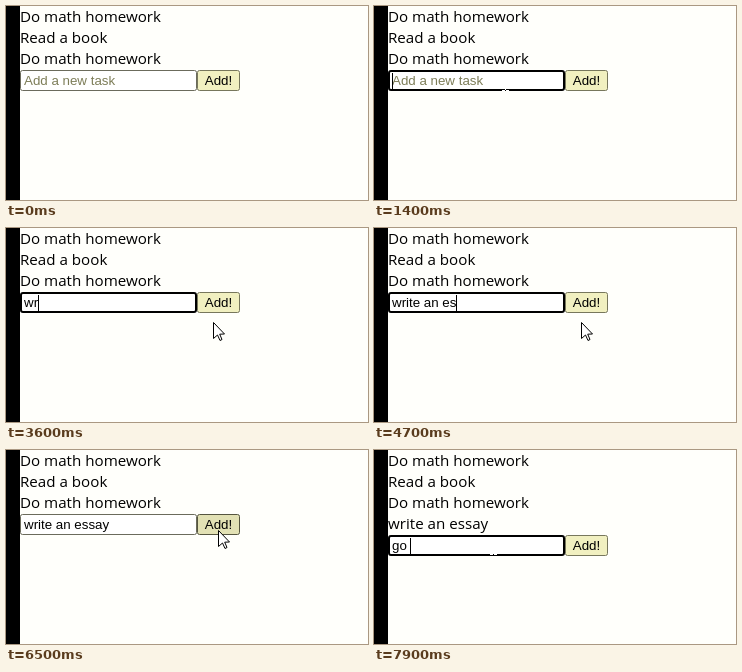
Write an HTML page with a canvas that moves like this. It is 362 px wide and 194 px high and loops after 8000 ms.

```html
<!DOCTYPE html>
<html lang="en">
<head>
<meta charset="utf-8">
<title>Task list</title>
<style>
html, body { margin: 0; width: 100%; height: 100%; overflow: hidden; background: #fffffb; }
canvas { display: block; width: 100vw; height: 100vh; }
</style>
</head>
<body>
<canvas id="stage" width="362" height="194"></canvas>
<script>
const ctx = document.getElementById('stage').getContext('2d');
const LOOP = 8000, STEP = 100, BLINK = 530, KEY_PACE = 130;
const LEFT = 14, ROW = 21, FIELD_W = 177, BUTTON_W = 43;
const BUTTON_X = LEFT + FIELD_W;
const LIST_FONT = '15.15px "Open Sans", sans-serif';
const FORM_FONT = '13.333px "Liberation Sans", Arial, sans-serif';
const TASKS = ['Do math homework', 'Read a book', 'Do math homework'];
const NEW_TASK = 'write an essay';

const FOCUSED = 1200, PRESSED = 6400, ADDED = 6600, SELECTED = 6900;
const TYPING = [{ text: NEW_TASK, start: 3400 }, { text: 'go ', start: 7500 }];

// Each glide starts where the one before it ended
const ENTRY = { x: 370, y: 130 };
const GLIDES = [
  { start: 100, length: 800, x: 158, y: 93 },
  { start: 1000, length: 300, x: 122, y: 75 },
  { start: 1300, length: 500, x: 207, y: 94 },
  { start: 5700, length: 400, x: 212, y: 80 },
  { start: ADDED, length: 300, x: 119, y: 97 }
];

const ease = p => p * p * (3 - 2 * p);
const clamp = p => Math.min(1, Math.max(0, p));

function pointerAt(t) {
  let { x, y } = ENTRY;
  for (const glide of GLIDES) {
    const p = ease(clamp((t - glide.start) / glide.length));
    x += (glide.x - x) * p;
    y += (glide.y - y) * p;
  }
  return { x: Math.round(x), y: Math.round(y) };
}

function fieldAt(t) {
  let text = '', last = FOCUSED;
  for (const run of TYPING) {
    if (t < run.start) continue;
    const n = Math.min(run.text.length, Math.floor((t - run.start) / KEY_PACE) + 1);
    text = run.text.slice(0, n);
    last = run.start + (n - 1) * KEY_PACE;
  }
  const focused = t >= FOCUSED && t < PRESSED || t >= SELECTED;
  const selected = t >= SELECTED && text === NEW_TASK;
  const caret = focused && !selected && (t - last) % (2 * BLINK) < BLINK;
  return { text, focused, selected, caret };
}

function rect(x, y, w, h, color) {
  ctx.fillStyle = color;
  ctx.fillRect(x, y, w, h);
}

function label(text, x, y, font, color = '#000') {
  ctx.font = font;
  ctx.fillStyle = color;
  ctx.fillText(text, x, y);
}

function box(x, y, w, line, fill, stroke) {
  ctx.beginPath();
  ctx.roundRect(x + line / 2, y + line / 2, w - line, ROW - line, 2);
  ctx.fillStyle = fill;
  ctx.fill();
  ctx.lineWidth = line;
  ctx.strokeStyle = stroke;
  ctx.stroke();
}

function drawField(y, { text, focused, selected, caret }) {
  const x = LEFT + 4;
  box(LEFT, y, FIELD_W, focused ? 2 : 1, '#fff', focused ? '#000' : '#6b6b5c');
  ctx.font = FORM_FONT;
  const w = ctx.measureText(text).width;
  if (selected) rect(x, y + 3, Math.round(w), 16, '#2f88e4');
  if (text) label(text, x, y + 15, FORM_FONT, selected ? '#fff' : '#000');
  else label('Add a new task', x, y + 15, FORM_FONT, '#7d7d58');
  if (caret) rect(Math.floor(x + w), y + 3, 1, 16, '#000');
}

function drawButton(y, hover) {
  box(BUTTON_X, y, BUTTON_W, 1, hover ? '#e2e1b4' : '#f1f0c0', hover ? '#55553f' : '#77775c');
  label('Add!', BUTTON_X + 7.8, y + 15, FORM_FONT);
}

function drawArrow(x, y) {
  ctx.save();
  ctx.translate(x + 0.5, y + 0.5);
  const shape = new Path2D('M0 0V16L4 12.5L6.5 18L8.5 17L6.2 11.7L11 11.5Z');
  ctx.fillStyle = '#fff';
  ctx.fill(shape);
  ctx.lineWidth = 1;
  ctx.strokeStyle = '#000';
  ctx.stroke(shape);
  ctx.restore();
}

function drawBeam(x, y) {
  rect(x, y - 7, 1, 14, '#fff');
  for (const dy of [-8, 7]) {
    rect(x - 3, y + dy, 3, 1, '#fff');
    rect(x + 1, y + dy, 3, 1, '#fff');
  }
}

function draw(t) {
  const tasks = t >= ADDED ? [...TASKS, NEW_TASK] : TASKS;
  const y = 1 + tasks.length * ROW;
  const { x: px, y: py } = pointerAt(t);
  const inRow = py >= y && py < y + ROW;
  const overField = inRow && px >= LEFT && px < BUTTON_X;
  const overButton = inRow && px >= BUTTON_X && px < BUTTON_X + BUTTON_W;

  rect(0, 0, 362, 194, '#fffffb');
  rect(0, 0, LEFT, 194, '#000');
  tasks.forEach((task, i) => label(task, LEFT, 16 + i * ROW, LIST_FONT));
  drawField(y, fieldAt(t));
  drawButton(y, overButton);
  (overField ? drawBeam : drawArrow)(px, py);
}

const start = performance.now();
function tick() {
  const t = (performance.now() - start) % LOOP;
  draw(Math.floor(t / STEP) * STEP);
  requestAnimationFrame(tick);
}
tick();
</script>
</body>
</html>
```
